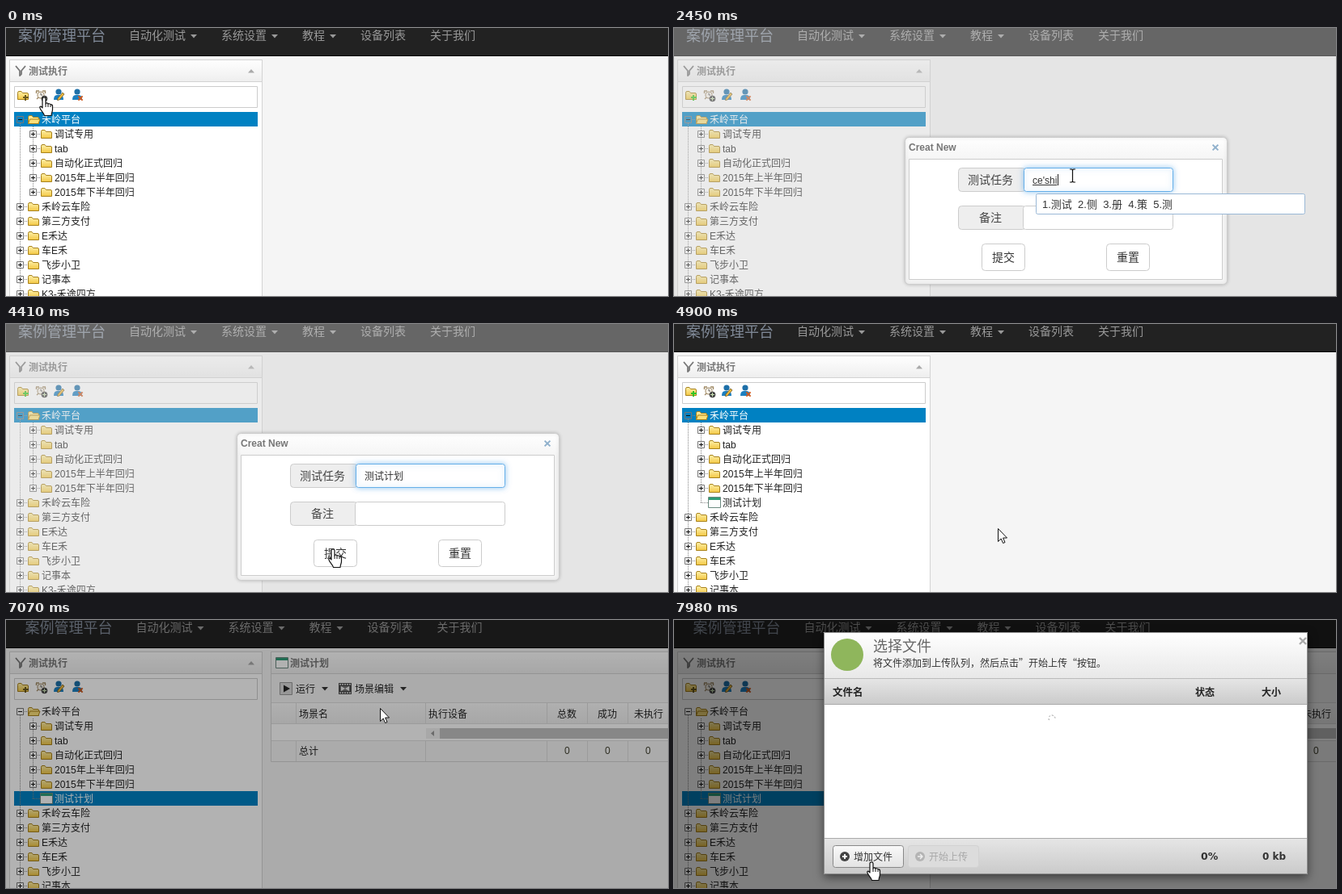
Recreate the animation shown at these times as an HTML page with a canvas. Size 818 by 332 pixels, loop 8 s.

```html
<!DOCTYPE html>
<html lang="zh">
<head>
<meta charset="utf-8">
<title>案例管理平台</title>
<style>
html, body { margin: 0; width: 100%; height: 100%; overflow: hidden; background: #f5f5f5; }
canvas { display: block; }
</style>
</head>
<body>
<canvas id="stage" width="818" height="332"></canvas>
<script>
const LOOP = 8000, STEP = 70;
const stage = document.getElementById('stage').getContext('2d');
const buffer = document.createElement('canvas');
buffer.width = 598;
buffer.height = 300;
let c = stage;

const LATIN = '"Liberation Sans"', CJK = '"Noto Sans CJK SC","Noto Sans CJK"';
const clamp = v => Math.max(0, Math.min(1, v));

// ---- drawing helpers ----
function text(s, x, cy, size = 12, color = '#222', bold = false, family) {
  const fam = family || (/[a-z0-9]/i.test(s) ? LATIN + ',' + CJK : CJK);
  c.font = `${bold ? 'bold ' : ''}${size}px ${fam},sans-serif`;
  c.fillStyle = color;
  c.fillText(s, x, Math.round(cy + size * 0.38));
  return c.measureText(s).width;
}

function rect(x, y, w, h, fill) {
  c.fillStyle = fill;
  c.fillRect(x, y, w, h);
}

function box(x, y, w, h, fill, line, r = 0) {
  c.beginPath();
  c.roundRect(x + 0.5, y + 0.5, w - 1, h - 1, r);
  if (fill) { c.fillStyle = fill; c.fill(); }
  if (line) { c.strokeStyle = line; c.lineWidth = 1; c.stroke(); }
}

function fade(y, h, a, b) {
  const g = c.createLinearGradient(0, y, 0, y + h);
  g.addColorStop(0, a);
  g.addColorStop(1, b);
  return g;
}

function shape(d, x, y, fill, line, width = 1) {
  const p = new Path2D(d);
  c.save();
  c.translate(x, y);
  if (fill) { c.fillStyle = fill; c.fill(p); }
  if (line) { c.strokeStyle = line; c.lineWidth = width; c.lineJoin = 'round'; c.stroke(p); }
  c.restore();
}

function disc(x, y, r, fill) {
  c.beginPath();
  c.arc(x, y, r, 0, 7);
  c.fillStyle = fill;
  c.fill();
}

function dots(x1, y1, x2, y2) {
  for (let x = x1, y = y1; x <= x2 && y <= y2;) {
    rect(x, y, 1, 1, '#888');
    if (x2 > x1) x += 2; else y += 2;
  }
}

const caret = (x, y, color) => shape('M0 0H8L4 4.5Z', x, y, color);
const plus = (x, y, color) => { rect(x - 3, y - 1, 7, 2, color); rect(x - 1, y - 3, 2, 7, color); };
const cross = (x, y, r, color, w) => shape(`M${-r} ${-r}L${r} ${r}M${r} ${-r}L${-r} ${r}`, x, y, null, color, w);

// ---- icons ----
function folder(x, y, open) {
  shape('M.5 2.5Q.5 .5 2 .5H5L6.5 2.5H12Q13.5 2.5 13.5 4V10.5H.5Z', x, y, fade(0, 11, '#fff3b0', '#f3c63f'), '#a8821c');
  if (open) shape('M2.5 5H15L13 10.5H.5Z', x, y, '#fbe07a', '#a8821c');
}

function sheet(x, y) {
  box(x, y, 16, 14, '#fdfdfd', '#6c8a80');
  rect(x + 1, y + 1, 14, 3, '#2f9d78');
}

function clock(x, y) {
  shape('M0 0H4M8 0H12M.5 0V3M11.5 0V3M1 10L3 8', x, y, null, '#a08a66', 1.4);
  disc(x + 6, y + 5, 4.6, '#a08a66');
  disc(x + 6, y + 5, 3.6, '#f7f3ea');
  shape('M6 2.5V5H8', x, y, null, '#666');
  disc(x + 10.5, y + 9.5, 3.8, '#444');
  rect(x + 8, y + 9, 5, 1, '#cfe8b8');
  rect(x + 10, y + 7, 1, 5, '#cfe8b8');
}

function person(x, y) {
  disc(x + 6, y + 4, 3.6, '#1d6fa8');
  shape('M0 14Q0 8 4 8H8Q12 8 12 14Z', x, y, '#1d7fbf');
}

function film(x, y) {
  rect(x, y, 16, 14, '#4d4d4d');
  for (let i = 0; i < 5; i++) {
    rect(x + 1 + i * 3, y + 1, 2, 1.5, '#ddd');
    rect(x + 1 + i * 3, y + 11.5, 2, 1.5, '#ddd');
  }
  rect(x + 2, y + 4, 12, 6, '#777');
  shape('M3 4L8 7L13 4V10L8 7L3 10Z', x, y, '#eee');
}

// ---- page ----
function navbar(dx) {
  rect(0, 0, 818, 35, '#222');
  rect(0, 34, 818, 1, '#080808');
  text('案例管理平台', 15 + dx, 9, 18, '#808a98');
  const items = [['自动化测试', 152, 228], ['系统设置', 266, 328], ['教程', 366, 400], ['设备列表', 438], ['关于我们', 524]];
  for (const [s, x, arrow] of items) {
    text(s, x + dx, 9, 14, '#999');
    if (arrow) caret(arrow + dx, 8, '#999');
  }
}

function toolbar(hover, badge) {
  box(10, 72, 301, 27, '#fff', '#ccc');
  if (hover) box(33, 73, 22, 23, '#e6e6e6', '#bbb', 4);
  folder(14, 78);
  plus(24, 86, badge);
  clock(37, 78);
  person(59, 75);
  shape('M0 7L6 0L8 2L2 9L-.5 9.5Z', 64, 80, '#f0b93c', '#6b5a2a', 0.8);
  person(82, 75);
  cross(92, 87, 2.6, '#d05a1e', 2);
}

const KIDS = ['调试专用', 'tab', '自动化正式回归', '2015年上半年回归', '2015年下半年回归'];
const ROOTS = ['禾岭云车险', '第三方支付', 'E禾达', '车E禾', '飞步小卫', '记事本', 'K3-禾途四方'];

function expander(x, cy, open) {
  box(x - 4, cy - 4, 9, 9, open ? null : '#fff', '#777');
  rect(x - 2, cy, 5, 1, '#111');
  if (!open) rect(x, cy - 2, 1, 5, '#111');
}

function tree(planned, picked, hover) {
  const sel = picked ? 212 : 104;
  if (hover) rect(10, 212, 301, 18, '#e6e6e6');
  rect(10, sel, 301, 18, '#0081c2');
  dots(17, 118, 17, 332);
  dots(33, 122, 33, planned ? 221 : 203);
  const row = (s, x, cy, open) => {
    dots(x, cy, x + 8, cy);
    expander(x, cy, open);
    folder(x + 10, cy - 5, open);
    text(s, x + 27, cy, 12, cy - 9 === sel ? '#fff' : '#222');
  };
  row('禾岭平台', 17, 113, true);
  let y = 131;
  for (const s of KIDS) { row(s, 33, y); y += 18; }
  if (planned) {
    dots(33, y, 41, y);
    sheet(42, y - 7);
    text('测试计划', 60, y, 12, picked ? '#fff' : '#222');
    y += 18;
  }
  for (const s of ROOTS) { row(s, 17, y); y += 18; }
}

function leftPanel(t) {
  box(4, 39, 313, 320, '#fff', '#d3d3d3');
  box(4, 39, 313, 28, fade(39, 28, '#fff', '#eee'), '#d3d3d3');
  shape('M0 0L5 6V12L7 10V6L12 0', 12, 47, null, '#777', 1.8);
  text('测试执行', 28, 53, 12, '#777', true);
  shape('M0 4.5L4 0L8 4.5Z', 299, 51, '#aaa');
  const outer = t < 910 || t >= 6930;
  toolbar(t >= 770 && t < 1470, outer ? '#6b5a1e' : '#35c425');
  tree(t >= 4690, t >= 5530, t >= 5250 && t < 5530);
}

function rightPanel(menuOpen) {
  box(327, 39, 520, 137, '#f5f5f5', '#d3d3d3');
  box(327, 39, 520, 28, fade(39, 28, '#fff', '#eee'), '#d3d3d3');
  sheet(333, 46);
  text('测试计划', 351, 53, 12, '#777', true);
  if (menuOpen) box(406, 72, 94, 26, '#e6e6e6', '#ddd', 5);
  box(338, 77, 16, 16, '#d8d8d8', '#999');
  shape('M0 0L8 4.5L0 9Z', 343, 80.5, '#222');
  text('运行', 358, 85);
  caret(390, 83, '#333');
  film(411, 78);
  text('场景编辑', 431, 85);
  caret(487, 83, '#333');

  rect(328, 103, 490, 25, fade(103, 25, '#fbfbfb', '#efefef'));
  rect(328, 128, 490, 22, '#fff');
  rect(519, 134, 299, 13, '#f0f0f0');
  rect(536, 134, 282, 13, '#c1c1c1');
  shape('M4 0V7L0 3.5Z', 525, 137, '#999');
  for (const y of [102, 128, 149]) rect(328, y, 490, 1, '#ddd');
  for (const x of [358, 518, 668, 718, 768]) {
    rect(x, 103, 1, 25, '#ddd');
    rect(x, 150, 1, 25, '#ddd');
  }
  const heads = [['场景名', 362], ['执行设备', 522], ['总数', 681], ['成功', 731], ['未执行', 776]];
  for (const [s, x] of heads) text(s, x, 116);
  text('总计', 362, 162);
  for (const x of [690, 740, 790]) text('0', x, 161, 12, '#443');
}

function menu(hover) {
  c.save();
  c.shadowColor = 'rgba(0,0,0,.3)';
  c.shadowBlur = 4;
  c.shadowOffsetX = c.shadowOffsetY = 2;
  box(407, 98, 149, 80, '#fff', '#ccc', 2);
  c.restore();
  rect(408, 99, 25, 78, '#fafafa');
  rect(433, 99, 1, 78, '#ddd');
  if (hover) box(409, 101, 144, 22, '#e6e6e6', '#ccc', 4);
  film(412, 105);
  plus(423, 115, '#2fae1c');
  film(412, 127);
  cross(424, 138, 3, '#a01818', 2);
  rect(435, 149, 117, 1, '#ccc');
  box(413, 165, 15, 6, '#ddd', '#888', 1);
  shape('M6.5 0L13 6.5H9.5V11H3.5V6.5H0Z', 413.5, 156, '#4cc92c', '#2c8a18');
  text('添加场景', 437, 112);
  text('删除场景', 437, 134);
  text('上传apk', 437, 163);
}

function statusBar(alpha) {
  c.globalAlpha = alpha;
  box(-5, 317, 331, 30, '#f2f2f2', '#ccc', 4);
  text('localhost:26349/RunCase/Index#', -6, 328, 13, '#777', false, '"Open Sans"');
  c.globalAlpha = 1;
}

// ---- task form ----
const TYPING = [
  [0, '', '', 0], [2030, '', 'c', 700], [2100, '', 'ce', 700], [2170, '', "ce's", 700],
  [2450, '', "ce'shi", 780], [2660, '测试', '', 0], [2870, '测试', 'j', 721], [2940, '测试', 'ji', 721],
  [3150, '测试', "ji'h", 793], [3220, '测试', "ji'hua", 793], [3360, '测试计划', '', 0]
];

function suggest(list) {
  const h = list.length * 24 + 2;
  box(432, 203, 185, h, '#fff', '#ccc');
  list.forEach((s, i) => text(s, 436, 216 + i * 24, 12, '#124a80'));
}

function taskForm(t) {
  rect(0, 0, 818, 332, 'rgba(204,204,204,.4)');
  c.save();
  c.shadowColor = 'rgba(0,0,0,.2)';
  c.shadowBlur = 4;
  box(285, 135, 399, 183, fade(135, 30, '#fff', '#f4f4f4'), '#ccc', 5);
  c.restore();
  text('Creat New', 290, 147, 12, '#777', true);
  cross(669, 148, 3.4, '#8fb0cc', 2);
  box(290, 162, 388, 150, '#fff', '#ccc');

  const focus = t >= 1540;
  box(351, 173, 84, 30, '#eee', '#ccc', 4);
  text('测试任务', 363, 188, 14, '#444');
  c.save();
  if (focus) { c.shadowColor = 'rgba(102,175,233,.7)'; c.shadowBlur = 7; }
  box(432, 173, 185, 30, focus ? '#fff' : '#fff3f3', focus ? '#66afe9' : '#ffa8a8', 3);
  c.restore();
  box(351, 220, 84, 30, '#eee', '#ccc', 4);
  box(431, 220, 186, 30, '#fff', '#ccc', 3);
  text('备注', 377, 235, 14, '#444');
  box(380, 267, 54, 34, '#fff', '#ccc', 4);
  text('提交', 393, 284, 14, '#333');
  box(534, 267, 54, 34, '#fff', '#ccc', 4);
  text('重置', 547, 284, 14, '#333');

  if (t >= 1330 && t < 2450) {
    box(629, 174, 60, 30, '#ffc', '#c93', 5);
    shape('M6 -5.5L0 0L6 5.5', 624.5, 188.5, '#ffc', '#c93');
    text('不能为空', 635, 188);
  }
  if (!focus) return;

  const [, done, pinyin, right] = TYPING.filter(k => k[0] <= t).pop();
  let x = 443;
  if (done) x += text(done, x, 188, 12, '#333');
  if (done === '测试' && !pinyin) suggest(['测试', '测试1', '测试计划', '测试任务', '测试二']);
  if (done === '测试计划' && t < 4340) suggest(['测试计划']);
  if (pinyin) {
    const w = text(pinyin, x, 188, 12, '#333');
    rect(x, 194, w, 1, '#333');
    const left = done ? 472 : 447;
    box(left, 205, right - left, 26, '#fff', '#9ab8d6', 2);
    c.save();
    c.beginPath();
    c.rect(left, 205, right - left - 4, 26);
    c.clip();
    text(done ? '1.计划  2.几  3.及  4.即  5.记' : '1.测试  2.侧  3.册  4.策  5.测', left + 8, 218, 13, '#333');
    c.restore();
    x += w;
  }
  if (t < 3850) rect(Math.round(x) + 1, 181, 1, 14, '#222');
}

// ---- upload dialog ----
function uploadBody(hover) {
  rect(185, 15, 598, 57, fade(15, 57, '#fff', '#e8e8e8'));
  rect(185, 72, 598, 33, fade(72, 33, '#e6e6e6', '#cacaca'));
  rect(185, 72, 598, 1, '#bbb');
  rect(185, 104, 598, 1, '#aaa');
  rect(185, 105, 598, 165, '#fff');
  rect(185, 270, 598, 45, fade(270, 45, '#e6e6e6', '#cacaca'));
  rect(185, 270, 598, 1, '#aaa');
  box(185, 15, 598, 300, null, '#8d8d8d');
  disc(214, 43, 20, '#8fb65c');
  text('选择文件', 246, 32, 18, '#666');
  text('将文件添加到上传队列，然后点击”开始上传“按钮。', 246, 53, 12, '#333');
  cross(777, 26, 4, '#aaa', 2.4);
  text('文件名', 196, 89, 12.5, '#222', true);
  text('状态', 644, 89, 12, '#222', true);
  text('大小', 726, 89, 12, '#222', true);

  box(196, 279, 88, 28, fade(279, 28, '#fafafa', hover ? '#e2e2e2' : '#d8d8d8'), hover ? '#888' : '#bbb', 3);
  disc(211, 293, 6, '#444');
  rect(208, 292, 6, 2, '#fff');
  rect(210, 290, 2, 6, '#fff');
  text('增加文件', 222, 293, 12, '#333');
  box(289, 279, 88, 28, '#dcdcdc', '#d2d2d2', 3);
  disc(304, 293, 6, '#b4b4b4');
  shape('M-3 0H3M0 -3L3 0L0 3', 304, 293, null, '#eee', 1.5);
  text('开始上传', 315, 293, 12, '#a8a8a8');
  text('0%', 651, 292, 12.5, '#333', true, '"DejaVu Sans"');
  text('0 kb', 727, 292, 12, '#333', true, '"DejaVu Sans"');
}

function uploadDialog(t) {
  rect(0, 0, 818, 332, `rgba(0,0,0,${0.5 * clamp((t - 6980) / 150)})`);
  const p = clamp((t - 7140) / 300);
  if (!p) return;
  c = buffer.getContext('2d');
  c.setTransform(1, 0, 0, 1, -185, -15);
  uploadBody(t >= 7910);
  c = stage;
  c.save();
  c.globalAlpha = clamp((t - 7140) / 150);
  c.shadowColor = 'rgba(0,0,0,.5)';
  c.shadowBlur = 12;
  c.shadowOffsetY = 4;
  c.drawImage(buffer, 185, Math.round(15 - 75 * Math.pow(1 - p, 1.6)));
  c.restore();
  if (p === 1) {
    c.save();
    c.strokeStyle = '#999';
    c.setLineDash([2, 2]);
    c.beginPath();
    c.arc(467, 122, 4, 2.6, 6.6);
    c.stroke();
    c.restore();
  }
}

// ---- pointer: time, x, y, kind ----
const PATH = [
  [0, 47, 85, 'hand'], [280, 42, 86, 'hand'], [490, 42, 86, 'hand'], [560, 40, 86, 'hand'],
  [980, 40, 86, 'arrow'], [1050, 40, 86, 'arrow'], [1400, 482, 180, 'beam'], [1470, 482, 180, 'beam'],
  [1680, 492, 183, 'beam'], [4060, 492, 183, 'beam'], [4130, 482, 190, 'arrow'], [4410, 404, 278, 'hand'],
  [4620, 404, 278, 'arrow'], [4900, 400, 253, 'arrow'], [4970, 400, 253, 'arrow'], [5320, 119, 225, 'hand'],
  [5600, 119, 225, 'arrow'], [6160, 463, 86, 'hand'], [6580, 463, 86, 'hand'], [6790, 462, 105, 'hand'],
  [6930, 462, 109, 'arrow'], [7420, 462, 109, 'arrow'], [7700, 266, 170, 'arrow'], [7910, 244, 296, 'hand'],
  [7980, 244, 299, 'hand'], [8000, 244, 299, 'hand']
];

const ARROW = 'M.5 .5V16.5L4.2 13L6.6 18.5L9 17.5L6.6 12H11.5Z';
const HAND = 'M4 2.5C4 .3 8 .3 8 2.5V9C8 7.5 11 7.5 11 9.5C11 8.3 14 8.5 14 10.3C14 9.5 16.5 9.7 16.5 11.5V16C16.5 19 15 20 15 23.5H6.5C6 20 1 16.5 .8 13.5C.7 11.8 2.5 11.5 4 14Z';
const BEAM = 'M-3.5 -8H-1L0 -7L1 -8H3.5M0 -7V7M-3.5 8H-1L0 7L1 8H3.5';

function pointer(t) {
  const i = PATH.findLastIndex(k => k[0] <= t);
  const a = PATH[i], b = PATH[i + 1];
  const u = (t - a[0]) / (b[0] - a[0]), e = u * u * (3 - 2 * u);
  const x = Math.round(a[1] + (b[1] - a[1]) * e), y = Math.round(a[2] + (b[2] - a[2]) * e);
  if (a[3] === 'arrow') shape(ARROW, x, y, '#fff', '#111');
  else if (a[3] === 'beam') shape(BEAM, x + 0.5, y, null, '#111', 1.2);
  else {
    shape(HAND, x - 6, y, '#fff', '#111', 1.2);
    shape('M8 9V13M11 10V13M14 11V13', x - 6, y, null, '#111');
  }
}

function draw(t) {
  rect(0, 0, 818, 332, '#f5f5f5');
  navbar(t >= 7000 ? 8.5 : 0);
  leftPanel(t);
  const menuOpen = t >= 6230 && t < 6930;
  if (t >= 5670) rightPanel(menuOpen);
  if (menuOpen) menu(t >= 6720);
  if (t >= 6370 && t < 6930) statusBar(t < 6440 ? 0.7 : 1);
  if (t >= 910 && t < 4620) taskForm(t);
  if (t >= 7000) uploadDialog(t);
  pointer(t);
}

const start = performance.now();
function tick() {
  const t = (performance.now() - start) % LOOP;
  draw(Math.floor(t / STEP) * STEP);
  requestAnimationFrame(tick);
}
tick();
</script>
</body>
</html>
```
